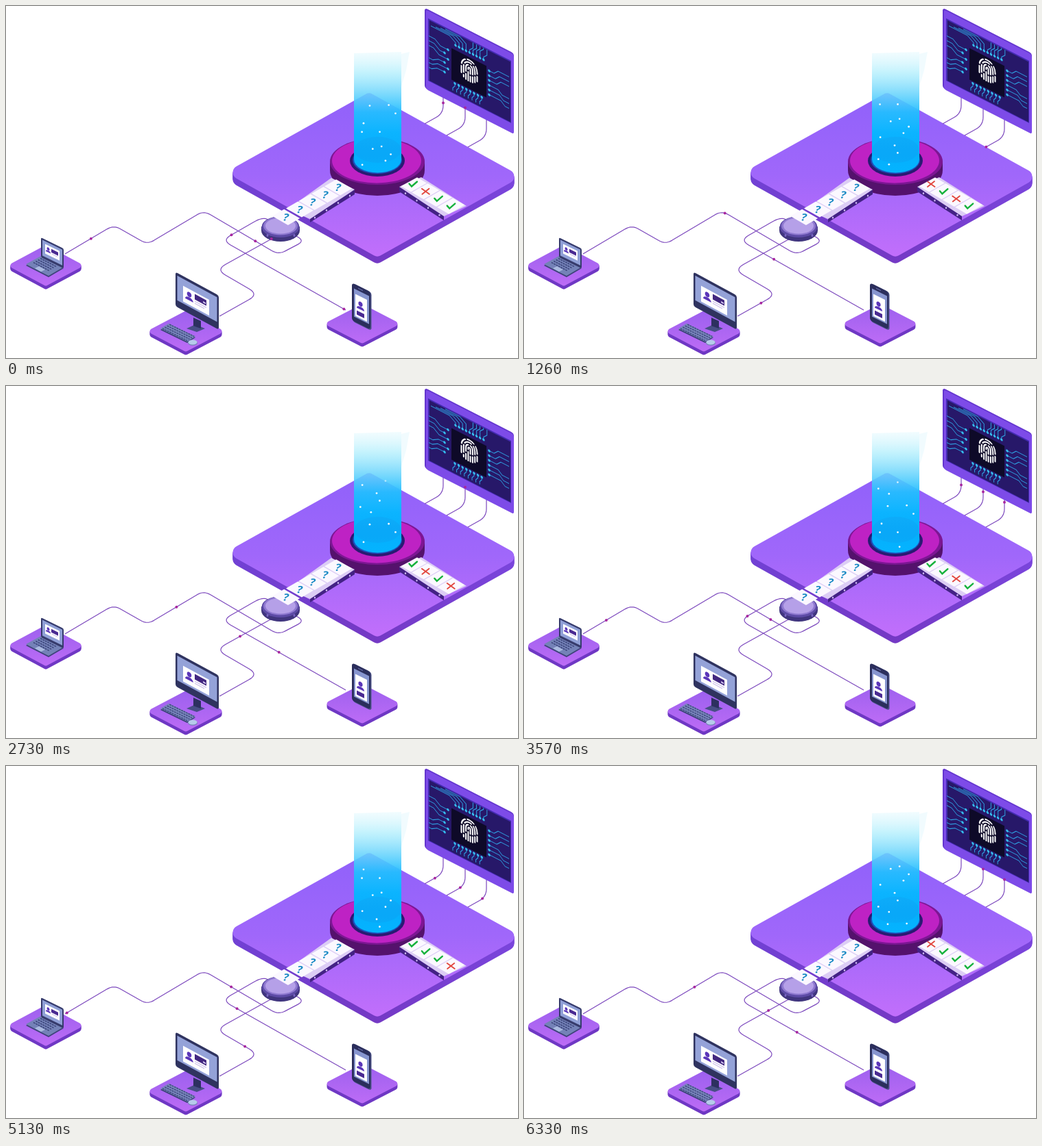
Animation, 746 px wide and 514 px high, one loop 6.36 s. Source, as an HTML page with a canvas:

```html
<!DOCTYPE html>
<html lang="en">
<head>
<meta charset="utf-8">
<title>Identity check</title>
<style>
html, body { margin: 0; width: 746px; height: 514px; overflow: hidden; background: #fff; }
canvas { display: block; }
</style>
</head>
<body>
<canvas id="stage" width="746" height="514"></canvas>
<script>
const W = 746, H = 514, LOOP = 6360;
const view = document.getElementById('stage').getContext('2d');
const base = document.createElement('canvas');
base.width = W;
base.height = H;
let g = base.getContext('2d');

// ---------- helpers ----------
const clamp = v => Math.max(0, Math.min(1, v));
const ease = v => { v = clamp(v); return v * v * (3 - 2 * v); };
const mod = (a, n) => ((a % n) + n) % n;
const rand = n => mod(Math.sin(n * 127.1 + 11.7) * 43758.5453, 1);

function trace(pts) {
  g.beginPath();
  pts.forEach(([x, y]) => g.lineTo(x, y));
}

function poly(pts, fill) {
  trace(pts);
  g.closePath();
  g.fillStyle = fill;
  g.fill();
}

function line(pts, color, width) {
  trace(pts);
  g.strokeStyle = color;
  g.lineWidth = width;
  g.stroke();
}

function clipTo(pts, draw) {
  g.save();
  trace(pts);
  g.clip();
  draw();
  g.restore();
}

function oval(x, y, rx, ry, fill) {
  g.beginPath();
  g.ellipse(x, y, rx, ry, 0, 0, 7);
  g.fillStyle = fill;
  g.fill();
}

function rect(x, y, w, h, fill, r = 0) {
  g.beginPath();
  g.roundRect(x, y, w, h, r);
  g.fillStyle = fill;
  g.fill();
}

function shade(x0, y0, x1, y1, ...colors) {
  const s = g.createLinearGradient(x0, y0, x1, y1);
  colors.forEach((c, i) => s.addColorStop(i / (colors.length - 1), c));
  return s;
}

// Draws on an upright wall that runs down to the right.
function wall(x, y, slope, draw) {
  g.save();
  g.transform(1, slope, 0, 1, x, y);
  draw();
  g.restore();
}

function slab(pts, depth, r, top, side) {
  const [ax, ay] = pts[0], [bx, by] = pts[3];
  for (let d = depth; d >= 0; d--) {
    g.beginPath();
    g.moveTo((ax + bx) / 2, (ay + by) / 2 + d);
    pts.forEach(([x, y], i) => {
      const [nx, ny] = pts[(i + 1) % 4];
      g.arcTo(x, y + d, nx, ny + d, r);
    });
    g.closePath();
    g.fillStyle = d ? side : top;
    g.fill();
  }
}

// Small pad around a centre point
function pad(x, y, w, h) {
  slab([[x - w, y], [x, y - h], [x + w, y], [x, y + h]], 5, 4,
    shade(x, y - h, x, y + h, '#9c60ee', '#bd6cf6'), '#6f38c4');
}

// Polyline with softened corners, flattened for drawing and sampling.
function route(pts, cut) {
  const out = [pts[0]];
  const toward = (a, b) => {
    const d = Math.hypot(b[0] - a[0], b[1] - a[1]), k = Math.min(cut, d / 2) / d;
    return [a[0] + (b[0] - a[0]) * k, a[1] + (b[1] - a[1]) * k];
  };
  for (let i = 1; i < pts.length - 1; i++) {
    const c = pts[i], a = toward(c, pts[i - 1]), b = toward(c, pts[i + 1]);
    for (let u = 0; u <= 1.001; u += 0.125) {
      const v = 1 - u;
      out.push([0, 1].map(k => v * v * a[k] + 2 * u * v * c[k] + u * u * b[k]));
    }
  }
  out.push(pts[pts.length - 1]);
  return out;
}

function along(pts, s) {
  for (let i = 1; i < pts.length; i++) {
    const [ax, ay] = pts[i - 1], [bx, by] = pts[i];
    const d = Math.hypot(bx - ax, by - ay);
    if (s <= d) return [ax + (bx - ax) * s / d, ay + (by - ay) * s / d];
    s -= d;
  }
  return null;
}

// ---------- cables ----------
// A pulse leaves every `gap` seconds, counted from `first`, at `speed` px/s.
function cable(pts, cut, speed, first, gap) {
  return { pts: route(pts, cut), speed, first, gap };
}

const screenCable = (x, y, first, gap) =>
  cable([[x - 27, y + 15], [x, y], [x, y - 27]], 12, 100, first, gap);

const cables = [
  cable([[86, 362], [157, 320], [206, 348], [288, 299], [397, 363], [435, 343], [416, 332]], 11, 151, -0.29, 1.8),
  cable([[495, 444], [315, 342], [374, 308], [388, 315]], 14, 117, -0.025, 1.8),
  cable([[311, 453], [368, 421], [306, 385], [387, 340]], 16, 80, 0.768, 3.384),
  screenCable(637, 157, 1.36, 1.8),
  screenCable(669, 174, -0.54, 0.907),
  screenCable(700, 191, 0.35, 0.907)
];

// ---------- still scene ----------
function person(x, y, r) {
  oval(x, y, r, r * 1.1, '#5a35b8');
  g.beginPath();
  g.ellipse(x, y + r * 2.6, r * 1.8, r * 1.4, 0, Math.PI, 0);
  g.fill();
}

function circuits() {
  const pin = (x, y, ...pts) => {
    line([[x, y], ...pts], '#2f9fe0', 1);
    oval(x, y, 1.8, 1.8, '#35c0f0');
  };
  for (let i = 0; i < 9; i++) {
    const x = 44 + i * 5.1, up = 27 - i % 4 * 2;
    if (i < 4) pin(x, 31, [x, up], [x - 9, up - 6], [8 + i * 7, up - 6]);
    else pin(x, 31, [x, up], [x + 5, up - 5], [x + 5, 14]);
  }
  for (let i = 0; i < 6; i++) {
    const y = 43 + i * 7, out = i < 3 ? -6 : 5;
    pin(33 - i % 2 * 5, y, [22 - i, y], [14 - i, y + out], [5, y + out]);
    pin(93, y, [100 + i * 2, y], [106 + i * 2, y + out], [122, y + out]);
  }
  for (let i = 0; i < 8; i++) {
    const x = 43 + i * 5.6;
    pin(x, 87, [x, 91], [x - 3, 95], [x - 3, 99]);
  }
}

function fingerprint() {
  g.save();
  g.translate(64, 59);
  g.lineCap = 'round';
  g.strokeStyle = '#fff';
  g.lineWidth = 2;
  for (let i = 0; i < 4; i++) {
    const r = 1.6 + i * 3.3, low = 14 - i * i * 0.6;
    g.setLineDash([13 - i, 3.6]);
    g.lineDashOffset = i * 4;
    g.beginPath();
    g.moveTo(-r, low);
    g.lineTo(-r, -4);
    g.ellipse(0, -4, r, r * 1.12, 0, Math.PI, 0);
    g.lineTo(r, low);
    g.stroke();
  }
  g.restore();
}

function bigScreen() {
  wall(611, 4, 0.512, () => {
    rect(-1, -1, 130, 117, '#6436cf', 4);
    rect(1, 1, 128, 116, '#7d4be8', 3);
    rect(4, 12, 121, 91, '#432bb0');
    rect(6, 14, 118, 88, '#271869');
    circuits();
    rect(38, 38, 51, 46, '#0e0a28');
    fingerprint();
  });
}

function ring() {
  const body = '#54126c';
  oval(541, 240, 69, 37, body);
  rect(472, 226, 138, 14, body);
  oval(541, 227, 69, 34, '#7d1694');
  oval(540, 226, 65, 32.5, '#be22c4');
  oval(541, 226, 40, 23, '#2a1a72');
  oval(541, 225, 36, 20, '#1f4cb8');
}

function beam() {
  poly([[576, 70], [588, 67], [583, 94], [576, 118]], 'rgba(190,238,252,.22)');
  g.beginPath();
  g.moveTo(507, 69);
  g.lineTo(576, 67);
  g.lineTo(576, 224);
  g.ellipse(541.5, 224, 34.5, 19.5, 0, 0, Math.PI);
  g.closePath();
  g.fillStyle = shade(0, 67, 0, 243, 'rgba(210,245,253,.3)', 'rgba(165,236,252,.65)',
    'rgba(110,214,252,.85)', 'rgba(35,190,255,.95)', '#0cb4ff', '#06aefc', '#04b4ff');
  g.fill();
  oval(541.5, 210, 34, 19, 'rgba(30,125,215,.14)');
}

function belts() {
  poly([[443, 310], [508, 268], [508, 275], [443, 316]], '#432285');
  poly([[410, 297], [474, 251], [508, 268], [443, 311]], '#dccdf5');
  poly([[573, 264], [638, 306], [638, 313], [573, 271]], '#432285');
  poly([[573, 264], [605, 250], [671, 292], [638, 307]], '#dccdf5');
  for (let i = 0; i < 4; i++) {
    oval(450 + i * 17, 309 - i * 10.7, 1.2, 1.5, '#cdb6f2');
    oval(582 + i * 16.5, 273.5 + i * 10.6, 1.2, 1.5, '#cdb6f2');
  }
}

function puck() {
  oval(400, 328, 28, 16, '#40357e');
  rect(372, 322, 56, 6, '#40357e');
  oval(400, 322.5, 27.5, 15.5, '#5d4ba6');
  oval(400, 321, 25, 13.5, '#8f79d0');
  oval(400, 321, 22, 11.5, '#b5a0e8');
  for (const x of [381, 420]) oval(x, 335, 1.5, 2, '#7a66c4');
}

// Rows of keys between two opposite edges of a keyboard
function keys(x, y, w, h, color) {
  g.setLineDash([2.8, 1]);
  for (let i = 0; i < 4; i++) line([[x + i * 3.4, y - i * 2], [x + w + i * 3.4, y + h - i * 2]], color, 1.5);
  g.setLineDash([]);
}

function laptop() {
  pad(58, 379, 56, 30);
  poly([[29, 379], [51, 366], [84, 383], [62, 396]], '#3d4378');
  poly([[29, 377], [51, 365], [84, 381], [62, 394]], '#7482b8');
  keys(40, 374.5, 23, 12, '#3a4378');
  poly([[42, 383], [48, 380], [57, 385], [51, 388]], '#a9b9df');
  wall(51, 338, 0.49, () => {
    rect(0, 0, 33, 29, '#363b6c', 2);
    rect(2, 2.5, 29, 23, '#8f9fd6');
    rect(6, 6.5, 21, 14, '#fff');
    person(10.5, 11.5, 2);
    rect(15, 9.5, 10, 5, '#4a2a92');
    rect(16, 16, 8, 1, '#c5b8e6');
  });
}

function desktop() {
  pad(262, 475, 57, 30);
  poly([[263, 471], [276, 465], [290, 471], [278, 476]], '#484e86');
  poly([[273, 455], [284, 460], [284, 471], [273, 467]], '#2d3060');
  poly([[225, 473], [237, 465], [276, 484], [264, 492]], '#3b4178');
  poly([[225, 471], [237, 463.5], [276, 482.5], [264, 490]], '#7886bb');
  keys(228, 471, 36, 17.5, '#414a80');
  oval(272, 492, 7, 3.8, '#7784b8');
  oval(272, 491, 6.5, 3.4, '#b6cbea');
  wall(247, 388.5, 0.54, () => {
    rect(0, 0, 63, 50, '#2f335f', 3);
    rect(2.5, 4, 58, 36, '#94a2d8');
    rect(11, 14, 38, 23, '#fff');
    person(20, 22, 3.3);
    rect(28, 17, 17, 8, '#42277f');
    rect(40, 21, 4, 2, '#d9cdf3');
    for (let i = 0; i < 2; i++) rect(28, 27 + i * 3, 17 - i * 3, 1.2, '#c9bce8');
  });
}

function phone() {
  pad(519, 464, 56, 29);
  wall(504, 404, 0.5, () => {
    rect(1.5, 0, 27, 56, '#4a5086', 4);
    rect(0, 0, 27, 55, '#2b2e5c', 4);
    rect(3, 7, 22, 41, '#8795cf');
    rect(5, 14, 17, 32, '#fff');
    person(12.5, 25, 3.1);
    rect(7, 37, 11, 6, '#4a2a92');
    rect(9, 3, 7, 1.2, '#656ba5');
  });
}

function scene() {
  g.fillStyle = '#fff';
  g.fillRect(0, 0, W, H);
  g.lineJoin = 'round';
  slab([[320, 243], [529, 126], [751, 249], [541, 367]], 10, 10,
    shade(0, 128, 0, 368, '#9061fa', '#a067fa', '#c26ffb'),
    shade(330, 0, 742, 0, '#7141d4', '#7439c4', '#7a45dc'));
  cables.forEach(c => line(c.pts, '#7c48bd', 1.2));
  bigScreen();
  ring();
  beam();
  belts();
  laptop();
  desktop();
  phone();
  puck();
}
scene();

// ---------- motion ----------
const CYCLE = 1350, FIRST = 255, SLIDE = 220;
const results = 'VVXVXVVVX';   // oldest first

// dir is -1 for cards lying along the left belt, 1 for the right belt
function card(x, y, dir, alpha, kind) {
  g.save();
  g.globalAlpha = alpha;
  g.translate(x, y);
  const corner = (p, q) => [8.6 * p + 11.5 * q, dir * (5 * p - 6.6 * q)];
  poly([corner(1, 1), corner(1, -1), corner(-1, -1), corner(-1, 1)], '#fbf8ff');
  g.lineCap = 'round';
  if (kind === 'V') line([[-5.5, -0.5], [-2, 3.5], [6, -3.5]], '#16b23c', 2.4);
  if (kind === 'X') {
    line([[-5.5, -4], [5.5, 4]], '#e2483f', 1.9);
    line([[-5, 4], [5, -4]], '#e2483f', 1.9);
  }
  if (kind === '?') {
    g.transform(1, 0.1, -0.3, 0.88, 0, 0);
    g.font = 'bold 16px "Open Sans", Arial, sans-serif';
    g.textAlign = 'center';
    g.fillStyle = '#1789c4';
    g.fillText('?', 0, 5.7);
  }
  g.restore();
}

function conveyors(ms) {
  const age = mod(ms - FIRST, CYCLE);
  const moved = Math.floor((ms - FIRST) / CYCLE) + clamp(age / SLIDE);
  const done = Math.floor(moved), p = moved - done;
  const eachCard = put => {
    for (let k = p ? -1 : 0; k < 4; k++) put(k, k + p);
  };

  clipTo([[360, 250], [474, 249], [512, 269], [440, 345], [360, 345]], () =>
    eachCard((k, u) => card(428 + 18.7 * u, 297 - 10.7 * u, -1, 1, '?')));

  clipTo([[570, 266], [605, 247], [700, 290], [660, 330], [610, 312]], () =>
    eachCard((k, u) => card(593 + 18.4 * u, 260 + 10.7 * u, 1,
      Math.min(1, 4 - u, 1.25 + u), results[3 + done - k])));

  // the next card fades in on the puck, then lifts to the belt entrance
  const lift = ease((age - 310) / 270);
  card(402 + 6 * lift, 321 - 12.7 * lift, -1, clamp(0.2 + age / 400), '?');
}

function pulses(t) {
  cables.forEach(({ pts, speed, first, gap }) => {
    for (let s = first + Math.floor((t - first) / gap) * gap; s > t - 4; s -= gap) {
      const at = along(pts, (t - s) * speed);
      if (at) oval(at[0], at[1], 2, 2, '#a8279f');
    }
  });
}

function glints(t) {
  const life = 4.5, count = 15;
  for (let i = 0; i < count; i++) {
    const y = 235 - 32 * mod(t + i * life / count + 0.4 * rand(i), life);
    if (y < 138) continue;
    g.globalAlpha = Math.min(1, (y - 134) / 8);
    oval(512 + 58 * rand(i + 50), y, 1.4, 1.4, '#f2fcff');
  }
  g.globalAlpha = 1;
}

g = view;
const begun = performance.now();
function frame() {
  const ms = (performance.now() - begun) % LOOP;
  g.drawImage(base, 0, 0);
  glints(ms / 1000);
  conveyors(ms);
  pulses(ms / 1000);
  requestAnimationFrame(frame);
}
frame();
</script>
</body>
</html>
```
